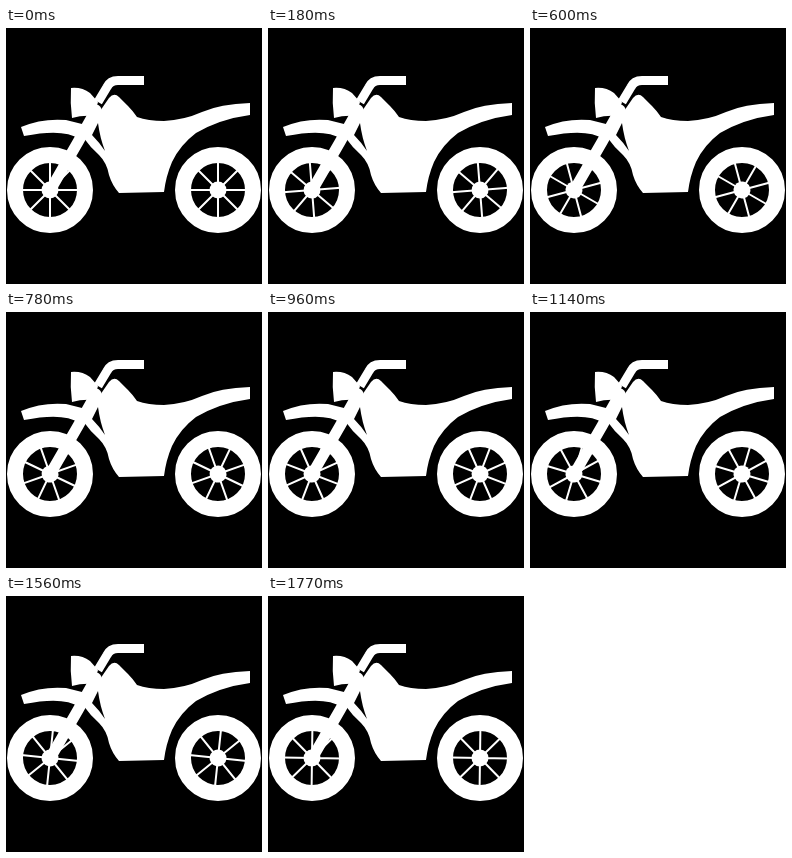
Write an HTML page with a canvas that moves like this. It is 256x256 px and loops after 1.8 s.

```html
<!DOCTYPE html>
<html lang="en">
<head>
<meta charset="utf-8">
<title>Motorbike</title>
<style>
html, body { margin: 0; width: 100%; height: 100%; overflow: hidden; background: #000; }
canvas { display: block; width: 100vw; height: 100vh; }
</style>
</head>
<body>
<canvas id="stage" width="256" height="256"></canvas>
<script>
const ctx = document.getElementById('stage').getContext('2d');
const LOOP = 1800, STEP = 30, SPOKES = 8;
const PITCH = 2 * Math.PI / SPOKES;

const body = new Path2D(`M92 86 L103 70 Q108 64 113 69 L122 78 Q127 83 131 89
  Q142 93 158 93 Q178 92 196 84 Q214 76 244 75 L244 87 Q214 91 190 105
  Q174 117 166 134 Q160 148 158 164 L113 165 Q106 157 103 147
  Q101 135 93 127 Q84 119 77 109 L86 92 Z`);
const slit = new Path2D('M92 95 Q94 110 99 123 Q93 114 86 107 Z');
const lamp = new Path2D('M65 60 Q76 59 84 65 L92 74 L88 88 Q76 87 66 90 Q64 75 65 60 Z');
const guard = new Path2D('M15 99 Q36 90 60 92 L80 97 L73 111 Q58 100 18 108 Z');
const bar = new Path2D('M138 52.5 L112 52.5 Q104 52.5 101 59 L92 74');
const fork = new Path2D('M90 82 L72 114 L46 159');

function line(path, width, cap) {
  ctx.lineWidth = width;
  ctx.lineCap = cap;
  ctx.stroke(path);
}

function wheel(x, y, angle) {
  ctx.save();
  ctx.translate(x, y);
  ctx.beginPath();
  ctx.arc(0, 0, 35, 0, 2 * Math.PI);
  ctx.lineWidth = 16;
  ctx.stroke();
  ctx.rotate(angle);
  ctx.beginPath();
  for (let i = 0; i < SPOKES; i++) {
    ctx.moveTo(0, 0);
    ctx.lineTo(29 * Math.cos(i * PITCH), 29 * Math.sin(i * PITCH));
  }
  ctx.lineWidth = 2;
  ctx.stroke();
  ctx.beginPath();
  ctx.arc(0, 0, 8.5, 0, 2 * Math.PI);
  ctx.fill();
  ctx.restore();
}

// Each loop turns the wheels back by one spoke, so it closes seamlessly.
function draw(time) {
  const step = Math.floor((time % LOOP) / STEP);
  const angle = -PITCH * step * STEP / LOOP;
  ctx.fillStyle = '#000';
  ctx.fillRect(0, 0, 256, 256);
  ctx.fillStyle = ctx.strokeStyle = '#fff';
  ctx.lineJoin = 'round';
  wheel(44, 162, angle);
  wheel(212, 162, angle);
  [body, lamp, guard].forEach(p => ctx.fill(p));
  line(bar, 9, 'butt');
  line(fork, 11, 'round');
  ctx.fillStyle = '#000';
  ctx.fill(slit);
}

let start;
function tick(now) {
  start ??= now;
  draw(now - start);
  requestAnimationFrame(tick);
}
draw(0);
requestAnimationFrame(tick);
</script>
</body>
</html>
```
